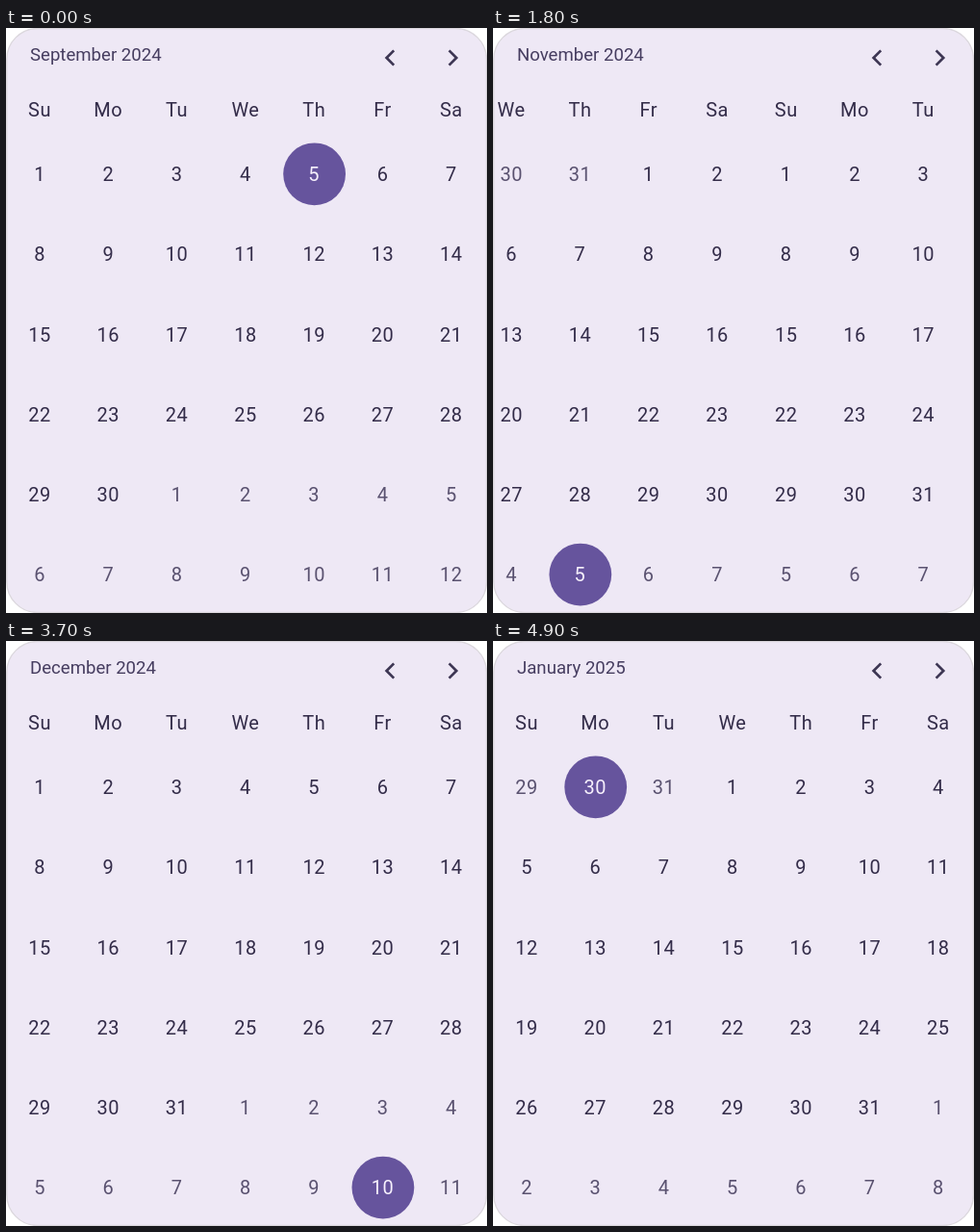
An HTML page with a canvas that plays this animation: 500x608 px, repeating every 5 s.

```html
<!DOCTYPE html>
<html lang="en">
<head>
<meta charset="utf-8">
<title>Calendar</title>
<style>
  html, body { margin: 0; width: 100%; height: 100%; overflow: hidden; background: #fff; }
  canvas { display: block; }
</style>
</head>
<body>
<canvas id="stage" width="500" height="608"></canvas>
<script>
const ctx = document.getElementById('stage').getContext('2d');
const LOOP = 5000, STEP = 100, SLIDE = 200;
const PAGE = 499.5, COL = 71.3, ROW = 83.25, LEFT = 35, TOP = 151.8;
const FIRST_MONTH = 8;
const DAYS = ['Su', 'Mo', 'Tu', 'We', 'Th', 'Fr', 'Sa'];
const MONTHS = ['September 2024', 'October 2024', 'November 2024', 'December 2024', 'January 2025'];

// Start times of the page slides, and [time, month, day] of each tap
const slides = [506, 1300, 1708, 3910];
const taps = [
  [0, 8, 5], [400, 9, 10], [1200, 10, 6], [1700, 11, 5],
  [2600, 11, 3], [3700, 12, 10], [4600, 11, 30]
];

const dateOf = (month, day) => new Date(2024, month, day);

function text(str, x, y, color) {
  ctx.fillStyle = color;
  ctx.fillText(str, x, y);
}

function drawPage(month, shift, picked) {
  const lead = dateOf(month, 1).getDay();
  ctx.font = '20px Roboto, sans-serif';
  ctx.letterSpacing = '0.5px';
  ctx.textAlign = 'center';
  DAYS.forEach((name, c) => text(name, LEFT + c * COL + shift, 92.3, '#332c49'));
  for (let i = 0; i < 42; i++) {
    const date = dateOf(month, 1 - lead + i);
    const x = LEFT + i % 7 * COL + shift;
    const y = TOP + Math.floor(i / 7) * ROW;
    let color = date.getMonth() === month % 12 ? '#332c49' : '#5a5270';
    if (date.getTime() === picked.getTime()) {
      ctx.fillStyle = '#66549d';
      ctx.beginPath();
      ctx.arc(x + 0.4, y, 32.4, 0, Math.PI * 2);
      ctx.fill();
      color = '#f6f0fc';
    }
    text(date.getDate(), x, y + 7.3, color);
  }
}

function chevron(x, dir) {
  ctx.beginPath();
  ctx.moveTo(x - dir * 3.8, 23.4);
  ctx.lineTo(x + dir * 3.8, 31);
  ctx.lineTo(x - dir * 3.8, 38.6);
  ctx.strokeStyle = '#3d3653';
  ctx.lineWidth = 2.7;
  ctx.stroke();
}

function draw(t) {
  const done = slides.filter(s => t >= s + SLIDE).length;
  const progress = Math.max(0, (t - slides[done]) / SLIDE || 0);
  const [, month, day] = taps.filter(tap => t >= tap[0]).pop();
  const picked = dateOf(month, day);

  ctx.clearRect(0, 0, 500, 608);
  ctx.beginPath();
  ctx.roundRect(0.8, 0.5, 498.7, 607, 32);
  ctx.fillStyle = '#eee8f5';
  ctx.fill();

  ctx.save();
  ctx.clip();
  drawPage(FIRST_MONTH + done, -progress * PAGE, picked);
  if (progress) drawPage(FIRST_MONTH + done + 1, (1 - progress) * PAGE, picked);
  ctx.restore();

  ctx.strokeStyle = '#dcd8de';
  ctx.lineWidth = 1.4;
  ctx.stroke(cardEdge);

  ctx.font = '18.6px Roboto, sans-serif';
  ctx.letterSpacing = '0px';
  ctx.textAlign = 'left';
  text(MONTHS[done], 25, 33.6, '#463d60');
  chevron(399.4, -1);
  chevron(464.4, 1);
}

const cardEdge = new Path2D();
cardEdge.roundRect(0.8, 0.5, 498.7, 607, 32);

const start = performance.now();
function frame() {
  const t = (performance.now() - start) % LOOP;
  draw(Math.floor(t / STEP) * STEP);
  requestAnimationFrame(frame);
}
frame();
</script>
</body>
</html>
```
